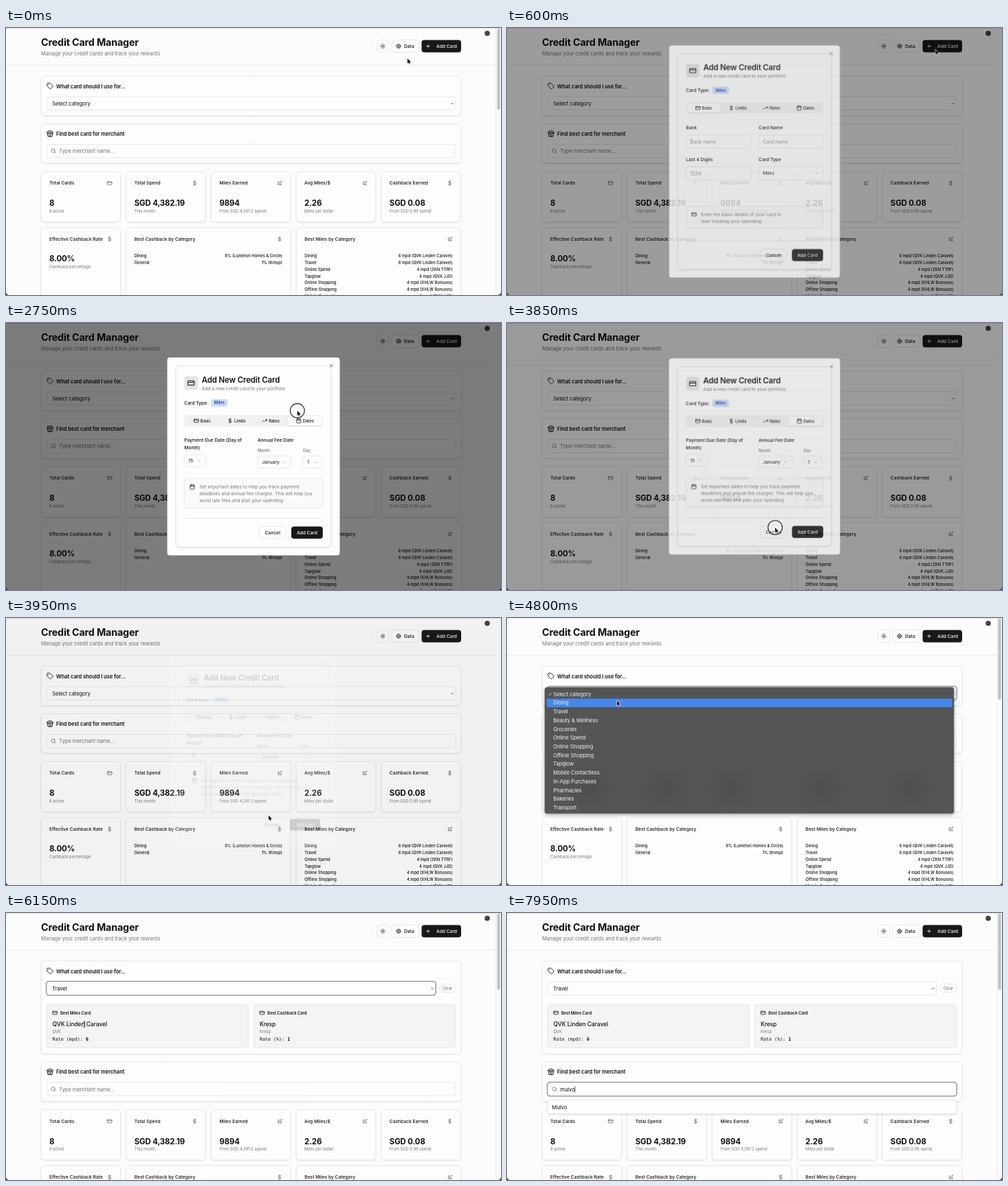
An HTML page with a canvas that plays this animation: 720x389 px, repeating every 8 s.

```html
<!DOCTYPE html>
<html lang="en">
<head>
<meta charset="utf-8">
<title>Credit Card Manager</title>
<style>
html, body { margin: 0; width: 100%; height: 100%; overflow: hidden; background: #fcfcfc; }
canvas { display: block; width: 720px; height: 389px; }
</style>
</head>
<body>
<canvas id="stage"></canvas>
<script>
const W = 720, H = 389, LOOP = 8000;
const dpr = window.devicePixelRatio || 1;
const INK = '#111113', GREY = '#77777b', LINE = '#e3e3e5', PAGE = '#fcfcfc';
// type sizes
const XS = 5.83, SM = 6.68, MD = 7.6, LG = 8.5, XL = 11.4;

function surface(el) {
  el.width = W * dpr;
  el.height = H * dpr;
  const ctx = el.getContext('2d');
  ctx.scale(dpr, dpr);
  return ctx;
}
const screen2d = surface(document.getElementById('stage'));
const layer = document.createElement('canvas');
const layer2d = surface(layer);
let c = screen2d;

const clamp = v => Math.max(0, Math.min(1, v));
const span = (t, a, b) => clamp((t - a) / (b - a));
const easeOut = p => 1 - (1 - p) ** 2;
const easeInOut = p => p * p * (3 - 2 * p);

/* ---------- drawing helpers ---------- */
function text(s, x, y, size = SM, weight = 400, color = INK, align = 'left') {
  c.font = `${weight} ${size}px Inter, sans-serif`;
  c.letterSpacing = (size > 7 ? -0.01 * size : 0) + 'px';
  c.textAlign = align;
  c.fillStyle = color;
  c.fillText(s, x, y + size * 0.37);
  const w = c.measureText(s).width;
  c.letterSpacing = '0px';
  return w;
}

function box(x, y, w, h, { r = 4, fill, line, lw = 0.8, shadow } = {}) {
  c.beginPath();
  c.roundRect(x, y, w, h, r);
  if (fill) {
    c.save();
    if (shadow) {
      c.shadowColor = `rgba(0,0,0,${shadow})`;
      c.shadowBlur = 2.5 * dpr;
      c.shadowOffsetY = dpr;
    }
    c.fillStyle = fill;
    c.fill();
    c.restore();
  }
  if (line) {
    c.strokeStyle = line;
    c.lineWidth = lw;
    c.stroke();
  }
}

function rule(x1, x2, y) {
  c.fillStyle = LINE;
  c.fillRect(x1, y, x2 - x1, 0.9);
}

const rays = (a, b) => Array.from({ length: 8 }, (_, i) => {
  const k = i * Math.PI / 4, px = Math.cos(k), py = Math.sin(k);
  return `M${12 + a * px} ${12 + a * py}L${12 + b * px} ${12 + b * py}`;
}).join('');

// icons on a 24 unit grid
const ICONS = {
  dollar: 'M12 2v20M17 5H9.5a3.5 3.5 0 0 0 0 7h5a3.5 3.5 0 0 1 0 7H6',
  card: 'M4 5h16a2 2 0 0 1 2 2v10a2 2 0 0 1-2 2H4a2 2 0 0 1-2-2V7a2 2 0 0 1 2-2zM2 10h20',
  plane: 'M17.8 19.2 16 11l3.5-3.5C21 6 21.5 4 21 3c-1-.5-3 0-4.5 1.5L13 8 4.8 6.2c-.5-.1-.9.1-1.1.5l-.3.5c-.2.5-.1 1 .3 1.3L9 12l-2 3H4l-1 1 3 2 2 3 1-1v-3l3-2 3.5 5.3c.3.4.8.5 1.3.3l.5-.2c.4-.3.6-.7.5-1.2z',
  tag: 'M12.6 2.6A2 2 0 0 0 11.2 2H4a2 2 0 0 0-2 2v7.2a2 2 0 0 0 .6 1.4l8.7 8.7a2.4 2.4 0 0 0 3.4 0l6.6-6.6a2.4 2.4 0 0 0 0-3.4zM7 7.5h1',
  store: 'M2 7l4.4-4.4A2 2 0 0 1 7.8 2h8.4a2 2 0 0 1 1.4.6L22 7M4 12v8a2 2 0 0 0 2 2h12a2 2 0 0 0 2-2v-8M9 22v-4a2 2 0 0 1 2-2h2a2 2 0 0 1 2 2v4M2 7h20v3a2.5 2.5 0 0 1-5 0 2.5 2.5 0 0 1-5 0 2.5 2.5 0 0 1-5 0 2.5 2.5 0 0 1-5 0z',
  search: 'M19 11a8 8 0 1 1-16 0a8 8 0 1 1 16 0M21 21l-4.3-4.3',
  sun: 'M16 12a4 4 0 1 1-8 0a4 4 0 1 1 8 0' + rays(8, 10.5),
  gear: 'M20 12a8 8 0 1 1-16 0a8 8 0 1 1 16 0M15 12a3 3 0 1 1-6 0a3 3 0 1 1 6 0' + rays(8, 10.5),
  plus: 'M5 12h14M12 5v14',
  trend: 'M22 7l-8.5 8.5-5-5L2 17M16 7h6v6',
  calendar: 'M8 2v4M16 2v4M3 10h18M5 4h14a2 2 0 0 1 2 2v14a2 2 0 0 1-2 2H5a2 2 0 0 1-2-2V6a2 2 0 0 1 2-2z',
  down: 'M5 9l7 7 7-7',
  cross: 'M5 5l14 14M19 5L5 19',
  check: 'M4 13l5 6L20 4'
};
const paths = Object.fromEntries(Object.entries(ICONS).map(([k, d]) => [k, new Path2D(d)]));

function icon(name, x, y, size = 8, color = INK, weight = 2.2) {
  c.save();
  c.translate(x - size / 2, y - size / 2);
  c.scale(size / 24, size / 24);
  c.lineWidth = weight;
  c.lineCap = c.lineJoin = 'round';
  c.strokeStyle = color;
  c.stroke(paths[name]);
  c.restore();
}

const panel = (x, y, w, h) => box(x, y, w, h, { r: 5, fill: '#fdfdfd', line: LINE, shadow: 0.1 });
const outline = (x, y, w, h) => box(x, y, w, h, { fill: '#fdfdfd', line: LINE });
const focusRing = (x, y, w, h) => box(x, y, w, h, { r: 4, line: '#9d9d9f', lw: 1.5 });

/* ---------- page ---------- */
const CATEGORIES = ['Select category', 'Dining', 'Travel', 'Beauty & Wellness', 'Groceries',
  'Online Spend', 'Online Shopping', 'Offline Shopping', 'Tapglow', 'Mobile Contactless',
  'In-App Purchases', 'Pharmacies', 'Bakeries', 'Transport'];
const STATS = [
  ['Total Cards', 'card', '8', '8 active'],
  ['Total Spend', 'dollar', 'SGD 4,382.19', 'This month'],
  ['Miles Earned', 'plane', '9894', 'From SGD 4,381.2 spend'],
  ['Avg Miles/$', 'plane', '2.26', 'Miles per dollar'],
  ['Cashback Earned', 'dollar', 'SGD 0.08', 'From SGD 0.99 spend']
];
const CASHBACK = [['Dining', '8% (Lumeton Homes & Circle)'], ['General', '1% (Kresp)']];
const MILES = [
  ['Dining', '6 mpd (QVK Linden Caravel)'], ['Travel', '6 mpd (QVK Linden Caravel)'],
  ['Online Spend', '4 mpd (ZKN TTRF)'], ['Tapglow', '4 mpd (QVK JJD)'],
  ['Online Shopping', '4 mpd (XHLW Bonuses)'], ['Offline Shopping', '4 mpd (XHLW Bonuses)'],
  ['Mobile Contactless', '4 mpd (QVK JJD)']
];
const SHOPS = ['Mulvo', 'Mesprin', 'Morvane'];
const QUERY = 'mulvo', KEYS = [7450, 7550, 7690, 7790, 7890];

const MODAL_IN = 500, MODAL_OUT = 3830, POPUP_IN = 4650, POPUP_OUT = 5360;
const RESULT = 5450, BLUR = 6490, FOCUS = 6890;

function header() {
  text('Credit Card Manager', 51, 20.4, 14.28, 700);
  text('Manage your credit cards and track your rewards', 51, 36.7, MD, 400, GREY);
  box(539.5, 17.5, 17, 18, { fill: '#fdfdfd', line: LINE });
  icon('sun', 548, 26.5, 8);
  box(561, 17.5, 39.5, 18, { fill: '#fdfdfd', line: LINE });
  icon('gear', 571, 26.5, 8);
  text('Data', 579, 26.6, SM, 500);
  box(604.5, 17.5, 57.5, 18, { fill: '#18181b' });
  icon('plus', 614, 26.5, 8, '#fff');
  text('Add Card', 626, 26.6, SM, 500, '#fafafa');
  c.fillStyle = '#444';
  c.beginPath();
  c.arc(700, 7.8, 3.8, 0, 7);
  c.fill();
  rule(0, 712, 53.6);
}

function resultCard(x, kind, name, bank, label, rate) {
  box(x, 133.3, 293.5, 63, { fill: '#f4f4f5', line: '#e2e2e4' });
  icon('card', x + 12.2, 145.5, 8);
  text(kind, x + 20, 145.5, XS, 600);
  text(name, x + 8.6, 162, LG, 500);
  text(bank, x + 8.6, 173, XS, 400, GREY);
  const mono = '6.7px "DejaVu Sans Mono", monospace';
  c.font = mono;
  c.fillStyle = INK;
  c.fillText(label + ' ', x + 8.6, 186.2);
  const w = c.measureText(label + ' ').width;
  c.font = 'bold ' + mono;
  c.fillText(rate, x + 8.6 + w, 186.2);
}

function picker(t) {
  const found = t >= RESULT, width = found ? 566 : 595;
  panel(51, 70, 611, found ? 135 : 57.5);
  icon('tag', 64, 84.5, 10);
  text('What card should I use for...', 73, 84.7, MD, 600);
  outline(59, 100, width, 19.5);
  if (t > POPUP_IN && t < BLUR) focusRing(58.6, 99.4, width + 0.6, 20.4);
  text(t >= POPUP_OUT + 40 ? 'Travel' : 'Select category', 67.3, 110, MD);
  icon('down', 59 + width - 5, 110, 5, INK, 3);
  if (!found) return;
  outline(630.3, 103.5, 23.5, 12);
  text('Clear', 642, 109.7, XS, 400, GREY, 'center');
  resultCard(59, 'Best Miles Card', 'QVK Linden Caravel', 'QVK', 'Rate (mpd):', '6');
  resultCard(360.3, 'Best Cashback Card', 'Kresp', 'Kresp', 'Rate (%):', '1');
}

function merchant(t) {
  panel(51, 139.5, 611, 57.5);
  icon('store', 64, 154, 10);
  text('Find best card for merchant', 73, 154, MD, 600);
  outline(59, 169.5, 595, 19.5);
  if (t >= FOCUS) focusRing(58.6, 169, 595.6, 20.4);
  icon('search', 69, 179.2, 8, '#666');
  const typed = QUERY.slice(0, KEYS.filter(k => t >= k).length);
  const w = typed ? text(typed, 77.3, 179.3, MD) : 0;
  if (!typed) text('Type merchant name...', 77.3, 179.3, MD, 400, GREY);
  if (t >= FOCUS) {
    c.fillStyle = INK;
    c.fillRect(77.2 + w, 175, 0.7, 8.8);
  }
  return typed;
}

function rows(list, x, right) {
  list.forEach(([a, b], i) => {
    const y = 332 + i * 9.8;
    text(a, x, y, XS, 500);
    text(b, right, y, XS, 500, INK, 'right');
  });
}

function stats() {
  STATS.forEach(([title, ic, value, note], i) => {
    const x = 51 + i * 123.7;
    panel(x, 209.2, 115.6, 73.3);
    text(title, x + 12, 226, SM, 500);
    icon(ic, x + 99.7, 226, 8, '#66666a');
    text(value, x + 12, 255, XL, 700);
    text(note, x + 12, 266.5, XS, 400, GREY);
  });
  panel(51, 290.7, 115.6, 130);
  text('Effective Cashback Rate', 63, 307.5, SM, 500);
  icon('dollar', 150.7, 307.5, 8, '#66666a');
  text('8.00%', 63, 336, XL, 700);
  text('Cashback percentage', 63, 347.5, XS, 400, GREY);
  panel(174.7, 290.7, 239.3, 130);
  text('Best Cashback by Category', 186.7, 307.5, SM, 500);
  icon('dollar', 398, 307.5, 8, '#66666a');
  rows(CASHBACK, 186.7, 402);
  panel(422.2, 290.7, 239.6, 130);
  text('Best Miles by Category', 434.3, 307.5, SM, 500);
  icon('plane', 645.7, 307.5, 8, '#66666a');
  rows(MILES, 434.3, 649.6);
}

function suggestions(typed) {
  const list = SHOPS.filter(s => s.toLowerCase().includes(typed));
  box(59, 195.3, 595, 20 * list.length, { r: 3, fill: '#fefefe', line: LINE, shadow: 0.15 });
  list.forEach((s, i) => text(s, 65.6, 205.4 + 20 * i, MD));
}

function page(t) {
  c.fillStyle = PAGE;
  c.fillRect(0, 0, W, H);
  header();
  picker(t);
  c.save();
  if (t >= RESULT) c.translate(0, 77.4);
  const typed = merchant(t);
  stats();
  if (typed) suggestions(typed);
  c.restore();
  if (t < MODAL_IN || t > MODAL_OUT + 210) {
    c.fillStyle = '#fafafa';
    c.fillRect(712.5, 0, 7.5, H);
    c.fillStyle = '#e8e8e8';
    c.fillRect(712.3, 0, 0.7, H);
    box(714.4, 1, 4.2, t >= RESULT ? 111 : 118, { r: 2.1, fill: '#c1c1c1' });
  }
}

/* ---------- dialog ---------- */
const TABS = [['Basic', 'card', 23.4, 365.6], ['Limits', 'dollar', 61.4, 327],
  ['Rates', 'trend', 32.4, 356.6], ['Dates', 'calendar', 50.2, 338.6]];
const TAB_TIMES = [1380, 1880, 2710];

function field(x, y, w, label, hint) {
  text(label, x, y, SM, 500);
  outline(x, y + 10.7, w, 19.6);
  text(hint, x + 6, y + 20.8, 7.3, 400, '#8a8a8e');
}

function drop(x, y, w, value, h = 17.5) {
  outline(x, y, w, h);
  text(value, x + 6.3, y + h / 2, SM);
  icon('down', x + w - 10, y + h / 2, 6.5, '#8a8a8e');
}

function hintBox(y, ic, lines) {
  box(259.3, y, 201.5, 13.5 + 9.7 * lines.length, { fill: '#fafafa', line: LINE });
  icon(ic, 271, y + 12, 8);
  lines.forEach((s, i) => text(s, 281.2, y + 12 + i * 9.7, SM, 400, GREY));
}

const BODIES = [
  y => {
    field(259.3, y + 121.5, 95, 'Bank', 'Bank name');
    field(366, y + 121.5, 95, 'Card Name', 'Card name');
    field(259.3, y + 168, 95, 'Last 4 Digits', '1234');
    text('Card Type', 366, y + 168, SM, 500);
    drop(366, y + 178.7, 95, 'Miles', 19.6);
    hintBox(y + 237, 'card', ['Enter the basic details of your card to', 'start tracking your spending.']);
  },
  y => {
    field(259.3, y + 121.5, 59.3, 'Credit Limit (SGD)', '5000');
    field(330.3, y + 121.5, 59.3, 'Annual Fee (SGD)', '196.60');
    hintBox(y + 163.3, 'dollar', ['Track your spending to monitor your credit utilization', 'and ensure you stay within your limits.']);
  },
  y => {
    field(259.3, y + 121.5, 95, 'Miles per Dollar', '1.2');
    field(366, y + 121.5, 95, 'Miles Value', '0.01');
    text('Category Rates', 259.3, y + 168, SM, 500);
    drop(259.3, y + 178.7, 95, 'Category', 19.6);
    hintBox(y + 222, 'trend', ['Set your reward rates to find the best card', 'for each spending category.']);
  },
  y => {
    text('Payment Due Date (Day of', 259.3, y + 120.7, SM, 500);
    text('Month)', 259.3, y + 131, SM, 500);
    drop(259.3, y + 141.5, 31.5, '15');
    text('Annual Fee Date', 366, y + 120.7, SM, 500);
    text('Month', 366, y + 135.7, XS, 500, GREY);
    text('Day', 432, y + 135.7, XS, 500, GREY);
    drop(366, y + 143.6, 49.5, 'January');
    drop(432, y + 143.6, 27.5, '1');
    hintBox(y + 176.5, 'calendar', ['Set important dates to help you track payment', 'deadlines and annual fee charges. This will help you', 'avoid late fees and plan your spending.']);
  }
];

function dialog(tab) {
  const [, , y, end] = TABS[tab];
  box(234.5, y, 251, end - y, { r: 4, fill: '#fdfdfd' });
  box(247, y + 12.3, 226, end - y - 24.5, { r: 5, fill: '#fdfdfd', line: '#dededf', shadow: 0.12 });
  icon('cross', 473, y + 12, 6.5, '#222');
  box(259.3, y + 27.3, 19.8, 19.8, { r: 4, fill: '#e4e4e6' });
  icon('card', 269.2, y + 37.2, 11);
  text('Add New Credit Card', 284.8, y + 32.7, XL, 600);
  text('Add a new credit card to your portfolio', 284.8, y + 45, SM, 400, GREY);
  text('Card Type:', 259.3, y + 66, SM, 500);
  box(298.2, y + 60.7, 24.2, 10.8, { r: 3, fill: '#c9ddfc' });
  text('Miles', 310.3, y + 66.1, XS, 600, '#1e40af', 'center');

  box(259.3, y + 83.7, 201.5, 17, { fill: '#f1f1f2' });
  TABS.forEach(([name, ic], i) => {
    const x = 260.5 + i * 49.8, on = i === tab;
    if (on) box(x, y + 85.4, 49.8, 13.6, { r: 3, fill: '#fdfdfd', shadow: 0.1 });
    c.font = `500 ${XS}px Inter, sans-serif`;
    const w = c.measureText(name).width, left = x + 24.9 - (w + 10) / 2;
    icon(ic, left + 4, y + 92.2, 8);
    text(name, left + 10, y + 92.2, XS, 500);
  });
  BODIES[tab](y);
  rule(259.3, 460.8, end - 54.3);
  outline(368.3, end - 42, 39, 17.6);
  text('Cancel', 387.8, end - 33.2, SM, 500, INK, 'center');
  box(415, end - 42, 45.8, 17.6, { fill: '#18181b' });
  text('Add Card', 437.9, end - 33.2, SM, 500, '#fafafa', 'center');
}

// presence of a dialog part, 0 to 1
const shown = (t, fade) => t < MODAL_OUT ? easeOut(span(t, MODAL_IN, MODAL_IN + 200))
  : 1 - easeOut(span(t, MODAL_OUT, MODAL_OUT + fade));

function modal(t) {
  const p = shown(t, 200);
  c.fillStyle = `rgba(0,0,0,${0.51 * shown(t, 170)})`;
  c.fillRect(0, 0, W, H);
  layer2d.clearRect(0, 0, W, H);
  c = layer2d;
  dialog(TAB_TIMES.filter(k => t >= k).length);
  c = screen2d;
  const s = 0.955 + 0.045 * p;
  c.save();
  c.globalAlpha = p;
  c.translate(360, 194.5);
  c.scale(s, s);
  c.drawImage(layer, -360, -194.5, W, H);
  c.restore();
}

/* ---------- category menu ---------- */
function menu(t, pointer) {
  if (t < POPUP_IN || t > RESULT) return;
  c.save();
  c.globalAlpha = 1 - span(t, POPUP_OUT, RESULT);
  c.shadowColor = 'rgba(0,0,0,.35)';
  c.shadowBlur = 5 * dpr;
  c.shadowOffsetY = 2 * dpr;
  box(55, 101, 595, 183.8, { r: 3, fill: '#555' });
  c.shadowColor = 'transparent';
  for (const x of [120, 232, 326, 457, 585]) {
    const g = c.createRadialGradient(x, 248, 0, x, 248, 36);
    g.addColorStop(0, 'rgba(0,0,0,.09)');
    g.addColorStop(1, 'rgba(0,0,0,0)');
    c.fillStyle = g;
    c.fillRect(x - 36, 212, 72, 72);
  }
  box(55, 101, 595, 183.8, { r: 3, line: '#6c6c6c', lw: 0.6 });
  const hot = Math.floor((pointer.y - 104.6) / 12.72);
  if (hot >= 0) box(57.6, 117.4 + (hot - 1) * 12.72, 590, 12.5, { r: 2, fill: '#4388ea' });
  CATEGORIES.forEach((s, i) => text(s, 67.2, 110.9 + i * 12.72, MD, 400, '#f0f0f0'));
  icon('check', 62.6, 111, 5.5, '#f0f0f0', 3);
  c.restore();
}

/* ---------- pointer ---------- */
const TRACK = [
  [50, 584, 44.6], [380, 634, 26], [560, 632, 28], [860, 460, 92], [1260, 340, 114], [1400, 342, 114],
  [1550, 363, 114.3], [1780, 387, 151], [1920, 389, 152], [2540, 423, 127], [2850, 424, 128],
  [3420, 410, 302.5], [3560, 393, 302], [3800, 393, 302], [3950, 382, 287.4], [4530, 155, 108],
  [4650, 155, 109], [4800, 160, 120.4], [5080, 163, 134], [5790, 162, 134], [6150, 114, 162],
  [6340, 122, 262], [6440, 132, 166], [6600, 134, 166], [6780, 150, 270], [6880, 151, 256]
];
const CLICKS = [420, 1330, 1840, 2670, 3750, 4590, 5290, 6450, 6860];

function locate(t) {
  const i = TRACK.findIndex(k => k[0] > t);
  if (i === 0) return { x: TRACK[0][1], y: TRACK[0][2] };
  const [t0, x0, y0] = TRACK[i < 0 ? TRACK.length - 1 : i - 1];
  if (i < 0) return { x: x0, y: y0 };
  const [t1, x1, y1] = TRACK[i], p = easeInOut(span(t, t0, t1));
  return { x: x0 + (x1 - x0) * p, y: y0 + (y1 - y0) * p };
}

const arrow = new Path2D('M0 0V7.2L1.6 5.7L2.6 8L3.7 7.5L2.7 5.3H4.9Z');
const beam = new Path2D('M-1.6-4.2Q0-4.2 0-3V3Q0 4.2-1.6 4.2M1.6-4.2Q0-4.2 0-3V3Q0 4.2 1.6 4.2');

function cursor(t, { x, y }) {
  const seen = 1 - span(t, 7180, 7250);
  if (!seen) return;
  c.save();
  c.translate(x, y);
  const hit = CLICKS.find(k => t >= k && t < k + 180);
  if (hit !== undefined) {
    c.globalAlpha = 1 - span(t, hit + 120, hit + 180);
    c.beginPath();
    c.arc(0, 0, 6 + 4.4 * easeOut(span(t, hit, hit + 60)), 0, 7);
    c.fillStyle = 'rgba(255,255,255,.3)';
    c.fill();
    c.strokeStyle = '#222';
    c.lineWidth = 1.1;
    c.stroke();
  }
  c.globalAlpha = seen;
  const overName = x > 67 && x < 150 && y > 157 && y < 167;
  const overInput = y > 247 && y < 267;
  c.lineJoin = 'round';
  if (t > RESULT && (overName || overInput)) {
    c.strokeStyle = '#fff';
    c.lineWidth = 1.8;
    c.stroke(beam);
    c.strokeStyle = '#111';
    c.lineWidth = 0.8;
    c.stroke(beam);
  } else {
    c.strokeStyle = '#fff';
    c.lineWidth = 1.1;
    c.stroke(arrow);
    c.fillStyle = '#000';
    c.fill(arrow);
  }
  c.restore();
}

function frameEdge() {
  c.fillStyle = 'rgba(0,0,0,.14)';
  c.fillRect(0, 0, W, 0.8);
  c.fillStyle = '#2b2b2b';
  c.beginPath();
  c.rect(0, 380, W, 9);
  c.roundRect(0, 360, W, 29, [0, 0, 4.5, 4.5]);
  c.rect(0, 360, W, 20);
  c.fill('evenodd');
}

function draw() {
  const t = performance.now() % LOOP, pointer = locate(t);
  page(t);
  if (t > MODAL_IN && t < MODAL_OUT + 200) modal(t);
  menu(t, pointer);
  frameEdge();
  cursor(t, pointer);
  requestAnimationFrame(draw);
}
draw();
</script>
</body>
</html>
```
